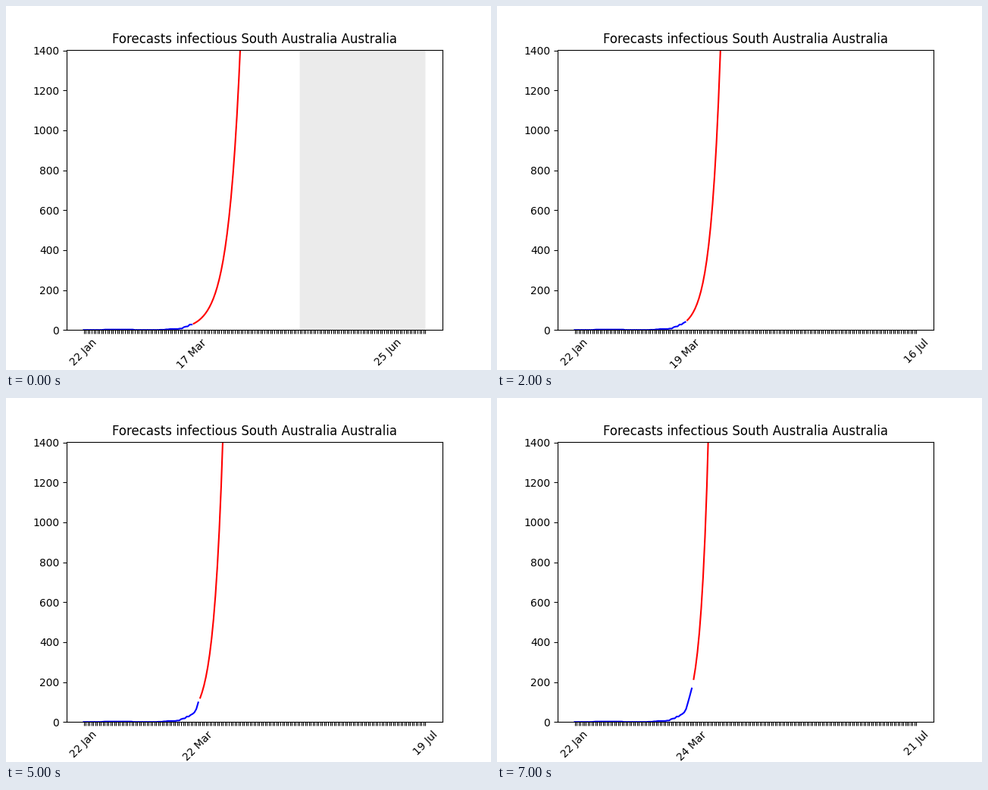
Write a matplotlib script that moves like this. It is 640 px wide and 480 px high and loops after 8 s.

```python
import numpy as np
import matplotlib.pyplot as plt
from matplotlib.animation import FuncAnimation

MONTHS = "Jan Feb Mar Apr May Jun Jul".split()
START = np.datetime64("2020-01-22")
FIRST_DAY = 55       # day index of the first forecast
HORIZON = 119        # days from the last count to the end of the axis
Y_TOP = 1404

# Active cases per day: long quiet stretch, then the outbreak
CASES = np.array([0] * 10 + [1] + [2] * 15 + [0] * 13 + [1] * 3 + [3] * 2
                 + [5] * 5 + [7, 7, 14, 17, 18, 27, 27, 35, 40, 48, 65, 98,
                             132, 168])
# Fitted daily growth rate of each forecast
GROWTH = [0.160, 0.208, 0.197, 0.184, 0.190, 0.2073, 0.225, 0.2437]

fig, ax = plt.subplots(figsize=(6.4, 4.8), dpi=100)


def day_label(day):
    year, month, date = str(START + np.timedelta64(day, "D")).split("-")
    return f"{int(date)} {MONTHS[int(month) - 1]}"


def draw(step):
    today = FIRST_DAY + step
    last = today + HORIZON
    ax.cla()

    marked = [0, today, last]
    if step == 0:
        # The first forecast shades the late period and marks its peak day
        marked[2] = today + 100
        ax.axvspan(110, last, color="#ebebeb", lw=0, snap=False, zorder=0.5)

    ax.plot(np.arange(today + 1), CASES[:today + 1], color="blue")
    ahead = np.arange(1, 41)
    ax.plot(today + ahead, CASES[today] * np.exp(GROWTH[step] * ahead),
            color="red")

    days = range(last + 1)
    ax.set_xticks(days, [day_label(d) if d in marked else "" for d in days],
                  rotation=45)
    ax.set_xlim(-0.05 * last, 1.05 * last)
    ax.set_ylim(0, Y_TOP)
    ax.set_title("Forecasts infectious South Australia Australia")


anim = FuncAnimation(fig, draw, frames=len(GROWTH), interval=1000,
                     init_func=lambda: None, repeat=True, repeat_delay=0)
plt.show()
```
